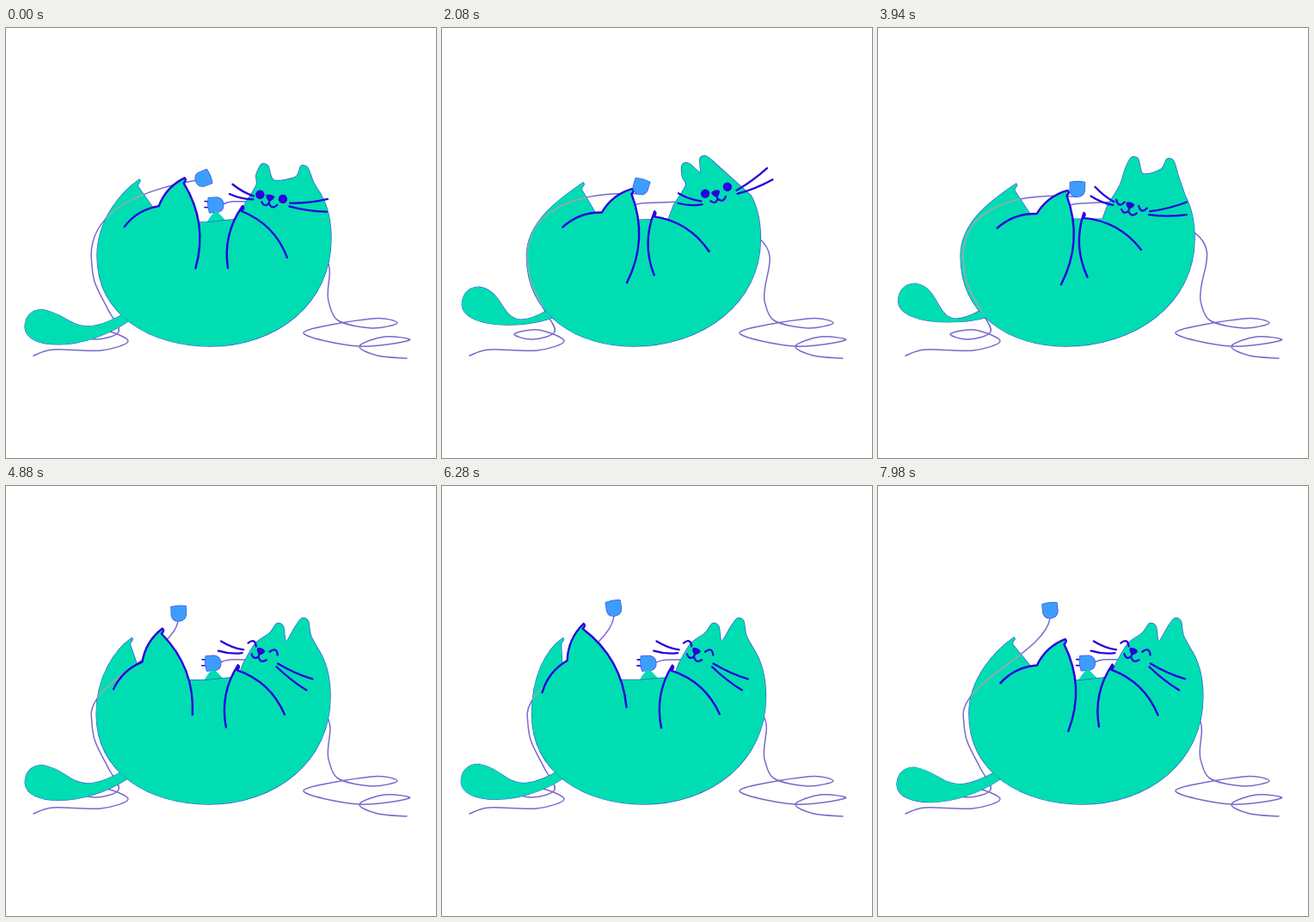
Write an HTML page with a canvas that moves like this. It is 500 by 500 pixels and loops after 8 s.

```html
<!DOCTYPE html>
<html lang="en">
<head>
<meta charset="utf-8">
<title>Rocking cat</title>
<style>
  html, body { margin: 0; width: 100%; height: 100%; overflow: hidden; background: #fff; }
  canvas { display: block; width: 100vmin; height: 100vmin; margin: 0 auto; }
</style>
</head>
<body>
<canvas id="stage" width="500" height="500"></canvas>
<script>
const ctx = document.getElementById('stage').getContext('2d');
const LOOP = 8000, ROCK = 1600, KICK = 1200, TAU = 2 * Math.PI, DEG = Math.PI / 180;
const TEAL = '#00ddb2', INK = '#2a00dc', PLUG = '#3d9dfc', CABLE = '#7a68cc', DIM = '#a3a3b0', EDGE = '#3a55de';

// Two ear tips, nose, face tilt, eye rise, left and right whisker angles
const HEADS = [
  [301,158, 347,160, 307,197, 11, -1, 21, 1],
  [290,157, 311,149, 326,192, -17, -3, 11, -29],
  [309,150, 350,152, 303,206, 15, 0, 30, -7],
  [320,160, 349,154, 297,192, 22, -5, 13, 31]
];
// Thigh, knee, toe and heel at both ends of a kick
const LEG_BACK = [118,239, 147,202, 166,159, 216,256];
const LEG_FRONT = [145,228, 189,209, 223,180, 222,288];
// Elbow, paw and shoulder at both ends of the rocking
const ARM_RIGHT = [258,279, 275,207, 327,267];
const ARM_LEFT = [247,287, 248,213, 311,260];

const lerp = (a, b, u) => a + (b - a) * u;
const mix = (a, b, u) => a.map((v, i) => lerp(v, b[i], u));
const shift = (p, dx, dy) => p.map((v, i) => v + (i % 2 ? dy : dx));

function ease(t, from, to) {
  const u = Math.max(0, Math.min(1, (t - from) / (to - from)));
  return u * u * (3 - 2 * u);
}

function turned(x, y, deg) {
  const c = Math.cos(deg * DEG), s = Math.sin(deg * DEG);
  return [x * c - y * s, x * s + y * c];
}

function stroke(path, color, width) {
  ctx.strokeStyle = color;
  ctx.lineWidth = width;
  ctx.stroke(path);
}

function fill(path, color) {
  ctx.fillStyle = color;
  ctx.fill(path);
}

function edged(path, color) {
  stroke(path, EDGE, 1.4);
  fill(path, color);
}

function startAt(x, y) {
  const path = new Path2D();
  path.moveTo(x, y);
  return path;
}

// Smooth curve through a flat list of points, starting at the first
function spline(path, p, tight = 6) {
  const last = p.length / 2 - 1;
  const pt = i => {
    const j = 2 * Math.max(0, Math.min(last, i));
    return [p[j], p[j + 1]];
  };
  for (let i = 0; i < last; i++) {
    const [a, b, c, d] = [pt(i - 1), pt(i), pt(i + 1), pt(i + 2)];
    path.bezierCurveTo(b[0] + (c[0] - a[0]) / tight, b[1] + (c[1] - a[1]) / tight,
      c[0] - (d[0] - b[0]) / tight, c[1] - (d[1] - b[1]) / tight, c[0], c[1]);
  }
  return path;
}

// Arc that swells to the left of its direction
function bow(path, x, y, x2, y2, bulge) {
  path.quadraticCurveTo((x + x2) / 2 + (y2 - y) * bulge, (y + y2) / 2 - (x2 - x) * bulge, x2, y2);
}

// Limb outline whose second-last point is the pointed paw
function limbPath(p) {
  const path = startAt(p[0], p[1]);
  const paw = p.length - 4;
  for (let i = 0; i < paw; i += 2) bow(path, ...p.slice(i, i + 4), .2);
  const [x, y] = [p[paw] - 1, p[paw + 1] + 6];
  path.quadraticCurveTo(x + 4, y - 4, x, y);
  bow(path, x, y, p[paw + 2], p[paw + 3], .22);
  return path;
}

function headOutline(h, dx) {
  const ear = (x, y) => [[12, 18], [4, 2], [-4, 1], [-9, 14]].flatMap(([ex, ey]) => {
    const [rx, ry] = turned(ex, ey, h[6] - 6);
    return [x + rx, y + ry];
  });
  return shift([367,195, ...ear(h[2], h[3]), ...ear(h[0], h[1]), 291,183, 277,206], dx, 0);
}

function bodyPath(r, farLeg, head, knee) {
  const dx = -8 * r, x = v => v + dx;
  const fx = x(142 + 18 * farLeg), fy = 176 + 4 * r, belly = 226 - 3 * r;
  const p = startAt(fx, fy);
  p.bezierCurveTo(fx - 20, fy + 14, x(106), 222, x(106), 265);
  p.bezierCurveTo(x(106), 335, x(170 - 4 * r), 370, x(237 - 8 * r), 370);
  p.bezierCurveTo(x(315 - 4 * r), 370, x(378), 320, x(378), 245);
  p.quadraticCurveTo(x(378), 215, head[0], head[1]);
  spline(p, head, 7);
  p.lineTo(x(271), 222);
  p.lineTo(x(235), belly);
  p.lineTo(x(203), belly);
  p.lineTo(knee[0] - 6, knee[1] + 3);
  p.lineTo(fx - 2, fy + 8);
  p.quadraticCurveTo(fx - 2, fy + 5, fx + 1, fy + 2);
  p.closePath();
  return p;
}

function tailPath(raise) {
  const cx = 42 + raise, cy = 347.5 - 20 * raise;
  const rx = 134 - 11 * raise, ry = 334 - 3 * raise;
  const p = startAt(rx, ry);
  p.bezierCurveTo(rx - 55, ry + 30, cx + 36, cy - 14, cx, cy - 20);
  p.bezierCurveTo(cx - 14, cy - 20, cx - 20, cy - 10, cx - 20, cy + 1);
  p.bezierCurveTo(cx - 18, cy + 27, cx + 48, cy + 29, rx + 8, ry + 7);
  return p;
}

function plug(x, y, deg, prongs) {
  ctx.save();
  ctx.translate(x, y);
  ctx.rotate(deg * DEG);
  if (prongs) stroke(new Path2D('M-3 -8V-13M4 -8V-13'), INK, 1.6);
  edged(new Path2D('M-9 -7Q0 -10 8 -9L9 1C8 10 -5 12 -8 3Z'), PLUG);
  ctx.restore();
}

function whisker(x, y, deg, length) {
  const [wx, wy] = turned(length, 0, deg);
  const p = startAt(x, y);
  p.quadraticCurveTo(x + wx / 2, y + wy / 2 + 3, x + wx, y + wy);
  stroke(p, INK, 2.3);
}

function drawFace(h, dx, turn) {
  const [x, y, tilt, rise, left, right] = h.slice(4);
  ctx.save();
  ctx.translate(x + dx, y);
  for (const side of [-1, 1]) {
    whisker(...turned(-19, 3 - rise + 2 * side, tilt), 180 + left - 8 * side, 28);
    whisker(...turned(24, 3 - rise + 2 * side, tilt), right + 7 * side, 44);
  }
  ctx.rotate(tilt * DEG);
  for (const side of [-1, 1]) {
    const ex = 1.5 + 13.5 * side;
    if (turn < 1.5) {
      const eye = new Path2D();
      eye.arc(ex, rise, 5.2, 0, TAU);
      fill(eye, INK);
    } else {
      const bend = lerp(7, -7, Math.max(0, turn - 2));
      const lid = startAt(ex - 5, rise - bend / 4);
      lid.quadraticCurveTo(ex, rise + bend, ex + 5, rise - bend / 4);
      stroke(lid, INK, 2.3);
    }
  }
  fill(new Path2D('M-5 -2Q0 -5 5 -2Q5 2 0 5Q-5 2 -5 -2'), INK);
  stroke(new Path2D('M0 3V7M-8.5 7Q-4 13 0 7Q5 14 10 7'), INK, 2.2);
  ctx.restore();
}

function draw(t) {
  // Rocking: 0 leans right, about 1 leans left; sway adds follow-through
  const phase = t / ROCK;
  const r = 1.25 * Math.pow(Math.abs(Math.sin(Math.PI * phase)), 1.3);
  const sway = r * (1 + Math.sin(TAU * phase));
  const dx = -8 * r;

  const turn = ease(t, 750, 1050) + ease(t, 2250, 2650) + ease(t, 4100, 4450);
  const i = Math.min(2, Math.floor(turn));
  const h = mix(HEADS[i], HEADS[i + 1], turn - i);

  // Laughing: the toy is thrown up and the legs kick
  const lift = ease(t, 4150, 4450);
  const rest = .73 + .2 * r + .1 * sway;
  const kick = lerp(rest, .5 + .5 * Math.cos(TAU * (t - 4500) / KICK), lift);
  const farLeg = kick + .3 * sway * (1 - lift);
  const bob = Math.cos(TAU * (t - 7090) / KICK);

  const leg = shift(mix(LEG_BACK, LEG_FRONT, kick), dx, 5 * r);
  const arm = mix(ARM_RIGHT, ARM_LEFT, r + .08 * Math.min(1, turn));
  const body = bodyPath(r, farLeg, headOutline(h, dx), leg.slice(2, 4));
  const tail = tailPath(.95 * r + .22 * sway);

  ctx.fillStyle = '#fff';
  ctx.fillRect(0, 0, 500, 500);
  ctx.lineCap = ctx.lineJoin = 'round';

  // Right cable
  const rightCable = startAt(372 - 4 * r, 268 - 25 * r);
  rightCable.bezierCurveTo(382 + 14 * r, 285 - 20 * r, 371, 300 - 10 * r, 375, 318);
  spline(rightCable, [375,318, 386,340, 425,349, 455,343, 425,338, 346,354, 410,370,
    469,363, 440,359, 411,370, 432,381, 466,384]);
  stroke(rightCable, CABLE, 1.5);

  // Left cable up to the toy
  const toyX = lerp(229 + 2 * r, 200 + bob, lift);
  const toyY = lerp(175 + 10 * r, 145 + 6 * bob, lift);
  const tilt = lerp(75 - 55 * r, 6 * bob, lift);
  const [plugX, plugY] = turned(0, 9, tilt);
  const leftCable = spline(startAt(32, 381), [32,381, 55,374, 110,375, 142,364, 112,351, 84,356,
    105,362, 131,353, 119,328, 103,295, 99,265]);
  leftCable.bezierCurveTo(lerp(99, 102, lift), lerp(215, 225, lift), lerp(150, 195, lift),
    lerp(190, 192, lift), toyX + plugX, toyY + plugY);
  stroke(leftCable, CABLE, 1.5);

  // Far paw holding the other plug
  const hx = 244 - 17 * r - 8 * sway, hy = 206 + 2 * r;
  const lead = startAt(hx + 8, hy - 1);
  lead.bezierCurveTo(hx + 18, hy - 6, hx + 28, hy - 4, 285 + dx, 202);
  stroke(lead, CABLE, 1.5);
  plug(hx, hy, -88, true);
  fill(spline(startAt(hx - 13, 230), [hx - 13,230, hx - 6,219, hx,214, hx + 6,218, hx + 17,230]), TEAL);

  edged(tail, TEAL);
  edged(body, TEAL);
  ctx.save();
  ctx.clip(body);
  stroke(leftCable, DIM, 1.6);
  ctx.restore();
  fill(tail, TEAL);

  for (const limb of [limbPath(leg), limbPath(arm)]) {
    fill(limb, TEAL);
    stroke(limb, INK, 2.4);
  }
  plug(toyX, toyY, tilt, false);
  drawFace(h, dx, turn);
}

const start = performance.now();
function frame() {
  draw((performance.now() - start) % LOOP);
  requestAnimationFrame(frame);
}
frame();
</script>
</body>
</html>
```
